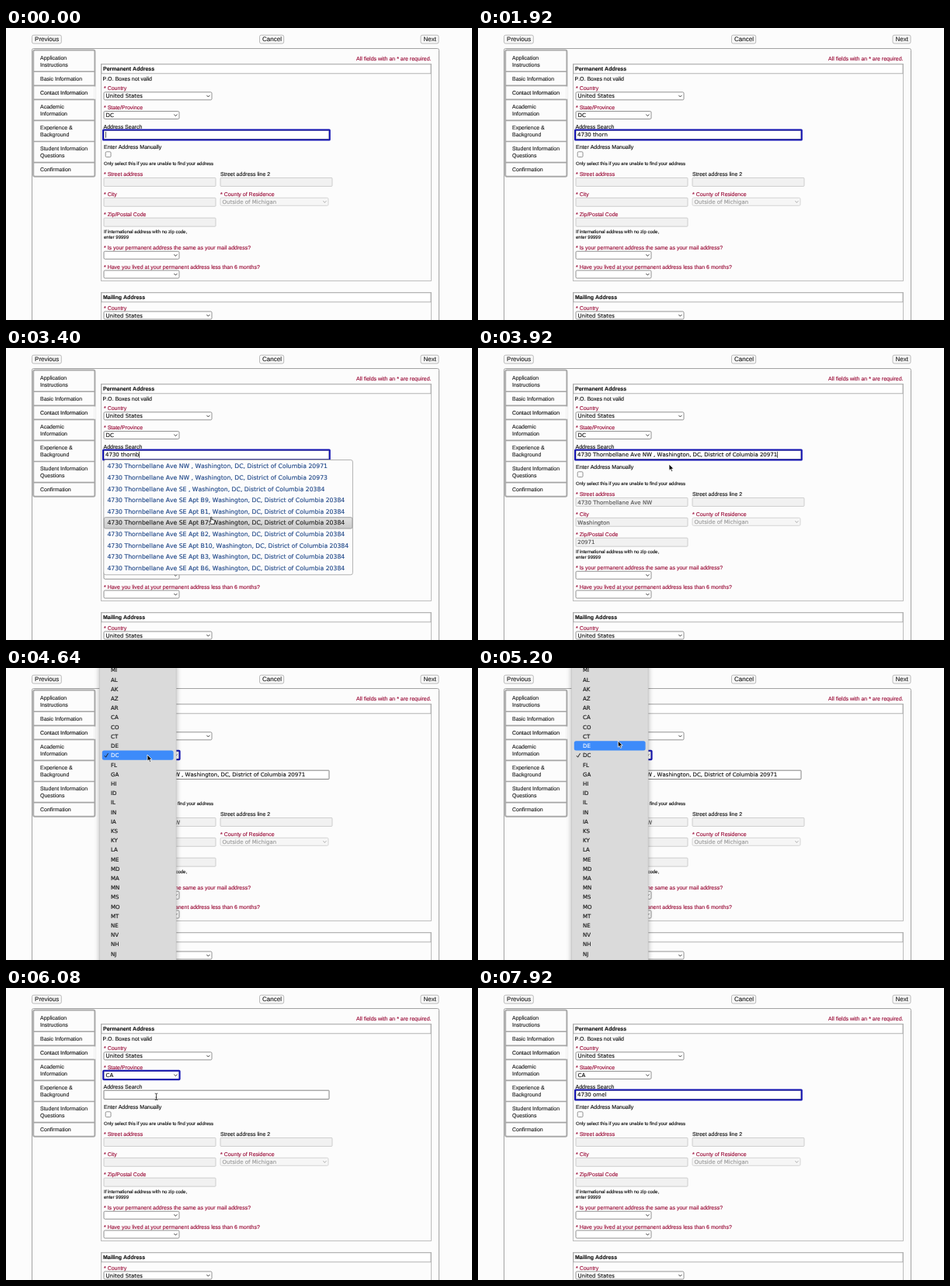
These frames come from a looping animation (600x377 px, 8 s). An HTML page:

```html
<!DOCTYPE html>
<html lang="en">
<head>
<meta charset="utf-8">
<title>Address form</title>
<style>
html, body { margin: 0; width: 100%; height: 100%; overflow: hidden; background: #fcfcfc; }
svg { display: block; width: 600px; height: 377px; }
text {
  font: 7px "Liberation Sans", Arial, sans-serif;
  color: #111; fill: currentColor; stroke: currentColor; stroke-width: 0.14px;
  white-space: pre; text-rendering: geometricPrecision; font-kerning: none;
}
.v { font-family: "DejaVu Sans", Verdana, sans-serif; }
.b { font-weight: bold; }
.s { font-size: 6px; }
.l { font-size: 8px; color: #222; }
.r { color: #990a36; }
.g { color: #999; }
.d { color: #555; }
.o { font-size: 7.73px; color: #1f4788; }
.on { color: #222; }
.hit { color: #fff; }
.menu { filter: drop-shadow(0 2px 3px rgba(0, 0, 0, .3)); }
</style>
</head>
<body>
<svg id="stage" viewBox="0 0 600 377" xmlns="http://www.w3.org/2000/svg"></svg>
<script>
const LOOP = 8000;
const stage = document.getElementById('stage');

function el(name, attrs, parent = stage) {
  const node = document.createElementNS(stage.namespaceURI, name);
  for (const key in attrs) node.setAttribute(key, attrs[key]);
  parent.appendChild(node);
  return node;
}
const group = (parent) => el('g', {}, parent);
const show = (node, on) => node.setAttribute('visibility', on ? 'visible' : 'hidden');

function text(x, y, str, cls = '', parent = stage) {
  const node = el('text', { x, y, class: cls }, parent);
  node.textContent = str;
  return node;
}
function setText(node, str) {
  if (node.textContent !== str) node.textContent = str;
}
function box(x, y, w, h, fill, stroke, rx = 0, sw = 1, parent = stage) {
  return el('rect', { x, y, width: w, height: h, fill, stroke, rx, 'stroke-width': sw }, parent);
}
function path(d, stroke, sw = 1, fill = 'none', parent = stage) {
  return el('path', { d, stroke, 'stroke-width': sw, fill, 'stroke-linejoin': 'round' }, parent);
}

function button(x, w, label) {
  box(x, 9.2, w, 10.8, '#f8f8f8', '#aaa', 2, 0.8);
  text(x + 3.6, 17.3, label, 'l');
}
function select(x, y, w, label, off) {
  box(x, y, w, 10, off ? '#f6f6f6' : '#fff', off ? '#ccc' : '#777', 1.5, 0.8);
  path(`M${x + w - 6.6} ${y + 4}l2 2.2l2-2.2`, off ? '#aaa' : '#333', 0.9);
  return text(x + 2.5, y + 7.6, label, off ? 'v g' : 'v');
}
function disabledField(x, y) {
  box(x, y, 144, 11, '#f1f1f1', '#c4c4c4', 1, 0.8);
  return text(x + 2.2, y + 8.2, '', 'v d');
}
function panel(y, h, title) {
  box(122.5, y, 425, h, 'none', '#b5b5b5', 0, 0.9);
  box(123, y + 0.3, 424, 12, '#fff', '#aaa', 0, 0.9);
  text(125, y + 8.8, title, 'b');
}

// Page frame
box(0, 0, 600, 377, '#fcfcfc', 'none');
button(33.5, 37.8, 'Previous');
button(326.5, 31.2, 'Cancel');
button(534, 23, 'Next');
box(33.5, 26.5, 524, 370, '#fcfcfc', '#999', 2, 0.9);
text(451, 41.5, 'All fields with an * are required.', 'r');

// Side tabs
const tabs = [
  [29, 'Application', 'Instructions'], [56.3, 'Basic Information'], [74.4, 'Contact Information'],
  [92.4, 'Academic', 'Information'], [119.4, 'Experience &', 'Background'],
  [146.5, 'Student Information', 'Questions'], [173.6, 'Confirmation']
];
box(35.2, 28.5, 79.2, 163.3, '#fcfcfc', '#aaa', 2, 2);
tabs.forEach(([y, ...lines], i) => {
  if (i) path(`M35 ${y}H114.5`, '#a5a5a5', 1.6);
  lines.forEach((line, n) => text(44, y + 11.6 + n * 9, line, i === 2 ? '' : 'on'));
});
path('M114.4 75.5V91.7', '#fcfcfc', 2.4);

// Form
panel(46.5, 280, 'Permanent Address');
panel(341.5, 60, 'Mailing Address');
[
  [124.5, 67.7, 'P.O. Boxes not valid'],
  [126, 80.3, '* Country', 'r'],
  [126, 105.3, '* State/Province', 'r'],
  [125.5, 130.2, 'Address Search'],
  [126, 156, 'Enter Address Manually'],
  [126, 177, 'Only select this if you are unable to find your address', 's'],
  [126, 191, '* Street address', 'r'],
  [276, 191, 'Street address line 2'],
  [126, 216.8, '* City', 'r'],
  [276, 216.8, '* County of Residence', 'r'],
  [126, 242.8, '* Zip/Postal Code', 'r'],
  [126, 265.2, 'If international address with no zip code,', 's'],
  [126, 271.8, 'enter 99999', 's'],
  [126, 286, '* Is your permanent address the same as your mail address?', 'r'],
  [126, 310.8, '* Have you lived at your permanent address less than 6 months?', 'r'],
  [126, 363.8, '* Country', 'r']
].forEach(args => text(...args));

select(126, 82.8, 139, 'United States');
const state = select(126, 107.5, 97, 'DC');
select(276, 219.3, 139, 'Outside of Michigan', true);
select(126, 288.3, 97, '');
select(126, 313, 97, '');
select(126, 366, 139, 'United States');
box(128.2, 159.8, 6.8, 6.8, '#fff', '#777', 1.3, 0.8);
const street = disabledField(126, 193.4);
disabledField(276, 193.4);
const city = disabledField(126, 219.3);
const zip = disabledField(126, 245.2);

box(126, 132.2, 290, 11.3, '#fff', '#777', 0.5, 0.9);
const search = text(128, 140.3, '', 'v');
const caret = box(0, 133.8, 0.7, 8, '#111', 'none');
const BLUE = '#1515b2';
const searchRing = box(125, 131.6, 291.8, 12.8, 'none', BLUE, 0.5, 2);
const stateRing = box(125.2, 106.8, 98.4, 11.4, 'none', BLUE, 0.8, 2);

// Suggestions
const ROAD = '4730 Thornbellane Ave ';
const CITY = ', Washington, DC, District of Columbia ';
const PICK = ROAD + 'NW ' + CITY + '20971';
const rows = [PICK, ROAD + 'NW ' + CITY + '20973', ROAD + 'SE ' + CITY + '20384'].concat(
  ['B9', 'B1', 'B7', 'B2', 'B10', 'B3', 'B6'].map(apt => ROAD + 'SE Apt ' + apt + CITY + '20384'));
const ROW = 14.6;
const list = group();
const shade = el('linearGradient', { id: 'shade', x2: 0, y2: 1 }, el('defs', {}));
el('stop', { offset: 0, 'stop-color': '#e2e2e2' }, shade);
el('stop', { offset: 1, 'stop-color': '#cacaca' }, shade);
box(125.8, 144.5, 320.6, 148.3, '#fcfcfc', '#aaa', 2.5, 0.9, list);
const rowMark = box(126.3, 0, 319.6, 14.4, 'url(#shade)', '#999', 2, 0.9, list);
const rowText = rows.map((row, i) => text(130.4, 155.4 + i * ROW, row, 'v o', list));

// State menu
const codes = ('MI AL AK AZ AR CA CO CT DE DC FL GA HI ID IL IN IA KS KY LA ME MD MA MN MS MO MT ' +
  'NE NV NH NJ').split(' ');
const STEP = 12.21;
const menu = group();
box(120.5, -5, 98.6, 390, '#dadada', '#c2c2c2', 0, 0.6, menu).setAttribute('class', 'menu');
const menuMark = box(123.8, 0, 91.8, 12.2, '#3d8bfa', 'none', 2.5, 0, menu);
const codeText = codes.map((code, i) => text(135, 5.4 + i * STEP, code, 'v', menu));
path('M127 113.2l1.5 2l3-5', '#222', 1, 'none', menu);

// Pointers, each with its hot spot at 0,0
const pointer = group();
const shapes = {
  arrow: group(pointer), hand: group(pointer), beam: group(pointer)
};
path('M0 0V8.2L1.9 6.5L3.2 9.4L4.6 8.8L3.3 6H5.9Z', '#fff', 0.8, '#000', shapes.arrow);
path('M-.7 0Q0-.8.6 0V3.2L1.7 3.1L2.8 3.5L4 3.9Q4.8 4.2 4.6 5.5L3.8 8.8H-.5L-2.8 5.6Q-2.7 4.6-1.8 5L-.7 5.9Z',
  '#111', 0.8, '#fff', shapes.hand);
path('M-1.8-4.2Q0-4.2 0-3.2Q0-4.2 1.8-4.2M0-3.2V3.4M-1.8 4.4Q0 4.4 0 3.4Q0 4.4 1.8 4.4M-1 .9H1', '#222', 0.8, 'none', shapes.beam);

// Timeline
const keys = (str, times) => times.map((t, i) => [t, str.slice(0, i + 1)]);
const typing = [
  [0, ''],
  ...keys('4730 thornb', [140, 280, 540, 660, 820, 1090, 1170, 1250, 1330, 1410, 2220]),
  [3800, PICK], [5640, ''],
  ...keys('4730 omel', [6640, 6710, 6780, 6870, 6990, 7100, 7200, 7300, 7400])
];
const moves = [
  [2560, 268, 280], [2840, 268, 280], [3320, 264.3, 218.5], [3420, 264.3, 218.5], [3720, 247, 153],
  [3920, 246, 150], [4040, 246, 150], [4380, 182, 112], [4860, 182, 112], [5200, 180.3, 94],
  [5480, 174, 65], [5660, 174, 65], [6040, 193.5, 140.5], [6200, 193.5, 139], [6640, 193.5, 139]
];
const LIST_ON = 2320, LIST_OFF = 3800, MENU_ON = 4480, MENU_OFF = 5640, REFOCUS = 6320;

function pointerAt(t) {
  if (t < moves[0][0] || t >= moves[moves.length - 1][0]) return null;
  const i = moves.findIndex(m => m[0] > t);
  const [t0, x0, y0] = moves[i - 1], [t1, x1, y1] = moves[i];
  const p = (t - t0) / (t1 - t0), e = p * p * (3 - 2 * p);
  return { x: x0 + (x1 - x0) * e, y: y0 + (y1 - y0) * e };
}

function draw(t) {
  const [typedAt, typed] = typing.filter(k => k[0] <= t).pop();
  const pos = pointerAt(t);
  const listOpen = t >= LIST_ON && t < LIST_OFF;
  const menuOpen = t >= MENU_ON && t < MENU_OFF;
  const filled = t >= LIST_OFF && t < MENU_OFF;
  const inState = t >= MENU_ON - 60 && t < REFOCUS;

  setText(search, typed);
  setText(state, t < MENU_OFF ? 'DC' : 'CA');
  setText(street, filled ? ROAD + 'NW' : '');
  setText(city, filled ? 'Washington' : '');
  setText(zip, filled ? '20971' : '');
  show(searchRing, !inState);
  show(stateRing, inState);

  const since = t - (t >= REFOCUS ? Math.max(typedAt, REFOCUS) : typedAt);
  show(caret, !inState && since % 1000 < 500);
  caret.setAttribute('x', 128 + (typed ? search.getComputedTextLength() : 0));

  show(list, listOpen);
  const row = listOpen && pos ? Math.floor((pos.y - 145.5) / ROW) : -1;
  show(rowMark, row >= 0);
  rowMark.setAttribute('y', 145.7 + row * ROW);
  rowText.forEach((node, i) => node.setAttribute('class', i === row ? 'v o on' : 'v o'));

  show(menu, menuOpen);
  const item = menuOpen ? Math.round((pos.y + 2 - 2.8) / STEP) : -1;
  show(menuMark, menuOpen);
  menuMark.setAttribute('y', item * STEP - 3.4);
  codeText.forEach((node, i) => node.setAttribute('class', i === item ? 'v hit' : 'v'));

  const inField = pos && !menuOpen && pos.y > 132 && pos.y < 144;
  const kind = !pos ? '' : listOpen ? 'hand' : inField ? 'beam' : 'arrow';
  for (const name in shapes) show(shapes[name], name === kind);
  if (pos) pointer.setAttribute('transform', `translate(${pos.x} ${pos.y})`);
}

const start = performance.now();
function tick() {
  draw((performance.now() - start) % LOOP);
  requestAnimationFrame(tick);
}
draw(0);
requestAnimationFrame(tick);
</script>
</body>
</html>
```
